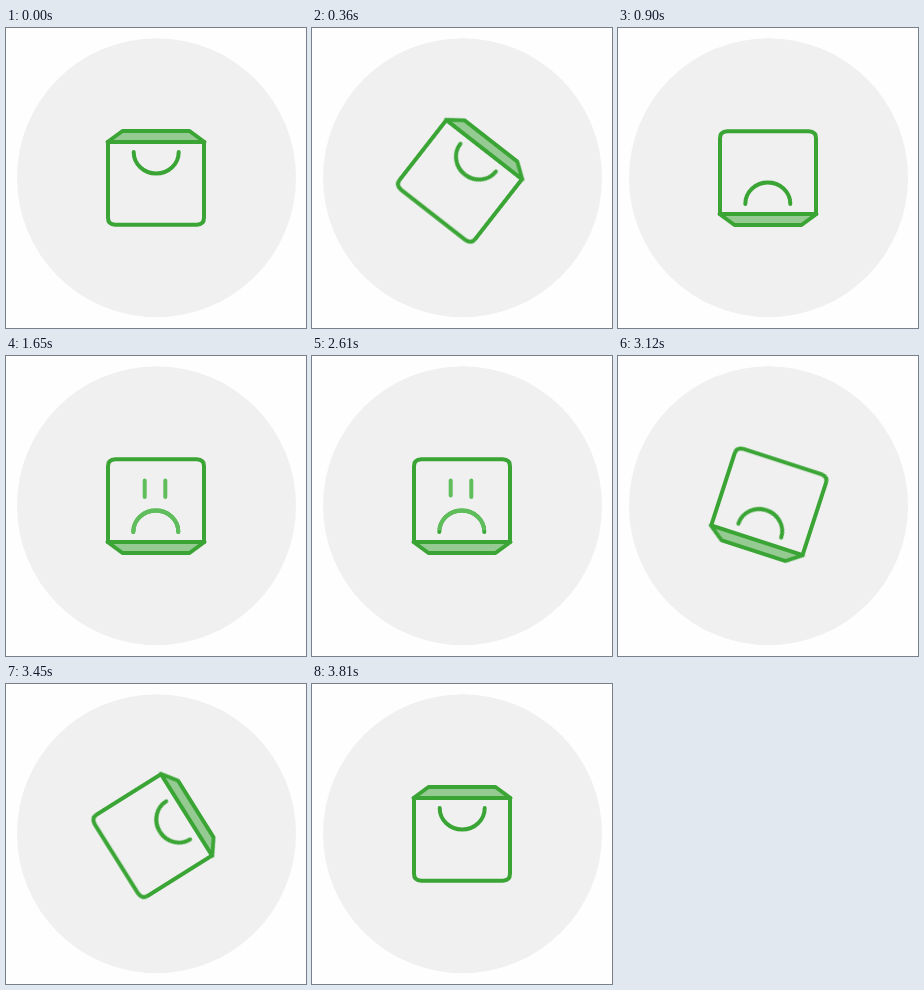
These frames come from a looping animation (300x300 px, 4530 ms). An HTML page:

```html
<!DOCTYPE html>
<html lang="en">
<head>
<meta charset="utf-8">
<title>Sad shopping bag</title>
<style>
  html, body { margin: 0; width: 100%; height: 100%; overflow: hidden; background: #fefefe; }
  svg { display: block; width: 100%; height: 100%; }

  .bag, .face path { animation: 4530ms linear infinite; }
  .bag {
    fill: none; stroke: #3aa535; stroke-width: 4;
    stroke-linecap: round; stroke-linejoin: round;
    transform-origin: 150px 150px;
    animation-name: flip;
  }
  .lid { fill: #95cb92; }
  .face { stroke: #5fbe5b; }
  .face path { visibility: hidden; }
  .face .eye { stroke-dasharray: 1 2; animation-name: eye; }
  .face .late { animation-delay: 30ms; }
  .face .mouth { animation-name: mouth; }

  /* Wind up by 20 degrees, swing half a turn, later the same way back */
  @keyframes flip {
    0% { transform: rotate(0deg); animation-timing-function: cubic-bezier(.33, 0, .67, 1); }
    3.974% { transform: rotate(-20deg); animation-timing-function: cubic-bezier(.25, 0, .39, 1); }
    19.868% { transform: rotate(180deg); }
    64.238% { transform: rotate(180deg); animation-timing-function: cubic-bezier(.33, 0, .67, 1); }
    68.212% { transform: rotate(200deg); animation-timing-function: cubic-bezier(.25, 0, .39, 1); }
    84.106%, 100% { transform: rotate(0deg); }
  }
  @keyframes eye {
    0%, 23.841% { visibility: hidden; stroke-dashoffset: 1; }
    35.762%, 56.954% { visibility: visible; stroke-dashoffset: 0; }
    64.238%, 100% { visibility: hidden; stroke-dashoffset: 1; }
  }
  /* Grows from the middle to both ends */
  @keyframes mouth {
    0%, 23.841% { visibility: hidden; stroke-dasharray: 0 2; stroke-dashoffset: -.5; }
    35.762%, 56.954% { visibility: visible; stroke-dasharray: 1 2; stroke-dashoffset: 0; }
    64.238%, 100% { visibility: hidden; stroke-dasharray: 0 2; stroke-dashoffset: -.5; }
  }
</style>
</head>
<body>
<svg viewBox="0 0 300 300">
  <circle cx="150.5" cy="149.7" r="139.5" fill="#f0f0f0"/>
  <g class="bag">
    <path class="lid" d="M101.5 114 L116.5 103 H183.5 L198.5 114 Z"/>
    <path d="M102 114 V189.500 Q102 196.700 109.200 196.700 H190.800 Q198 196.700 198 189.500 V114"/>
    <path d="M127.700 124 c0 12 10 21.500 22.500 21.500 s22.500 -9.500 22.500 -21.500"/>
    <g class="face" transform="rotate(180 150 150)">
      <path class="eye" pathLength="1" d="M138.700 124.500 V141"/>
      <path class="eye late" pathLength="1" d="M159.300 124.500 V141"/>
      <path class="mouth" pathLength="1" d="M127.300 176 c0 -12 10 -21.500 22.500 -21.500 s22.500 9.500 22.500 21.500"/>
    </g>
  </g>
</svg>
</body>
</html>
```
